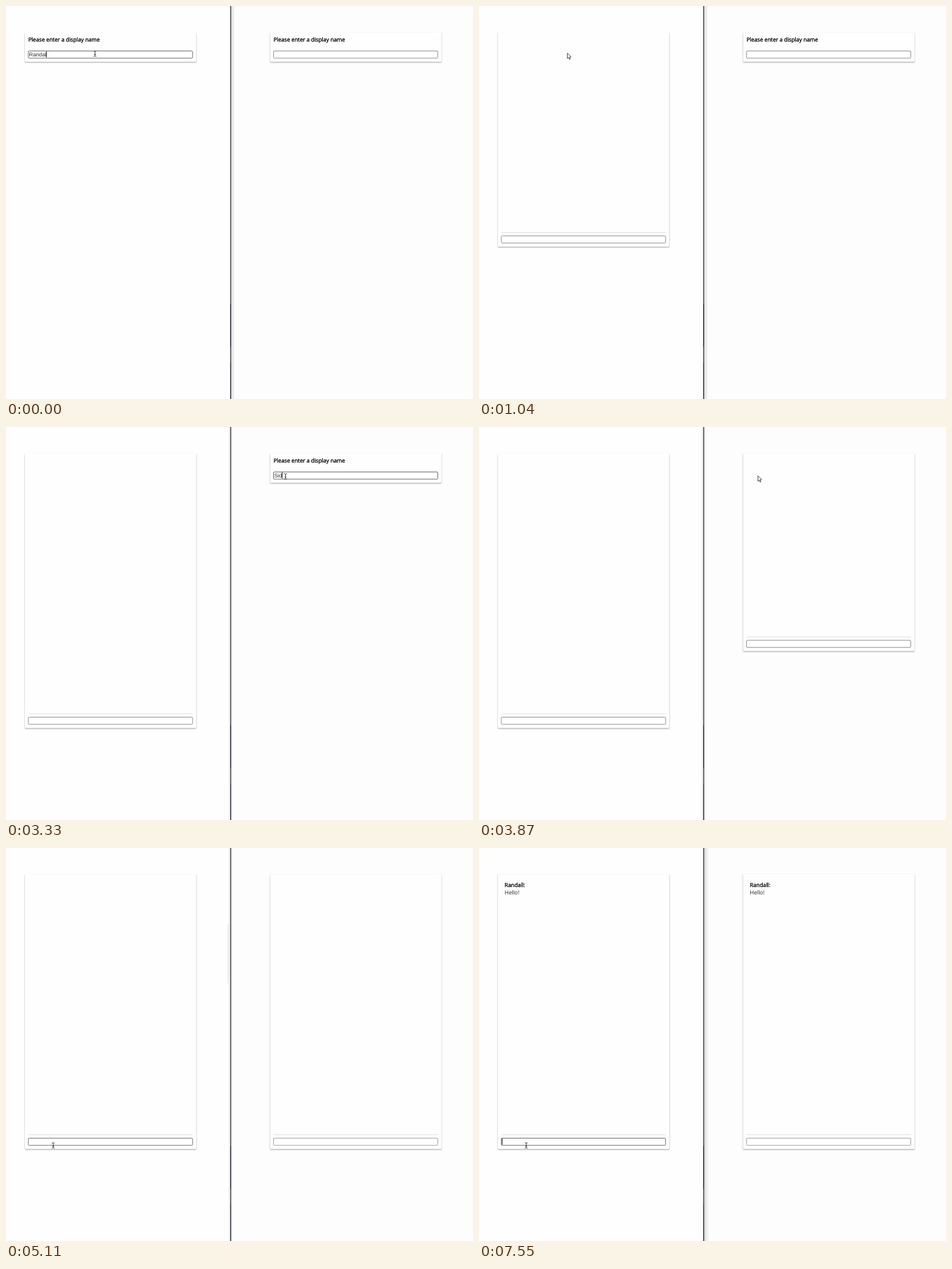
Recreate the animation shown at these times as an HTML page with a canvas. Size 816 by 686 pixels, loop 8000 ms.

```html
<!DOCTYPE html>
<html lang="en">
<head>
<meta charset="utf-8">
<title>Chat demo</title>
<style>
html, body { margin: 0; width: 100%; height: 100%; overflow: hidden; background: #fefefe; }
canvas { display: block; }
</style>
</head>
<body>
<canvas id="stage" width="816" height="686"></canvas>
<script>
const ctx = document.getElementById('stage').getContext('2d');
const LOOP = 8000;
const TOP = 46, SHORT = 97.5, TALL = 525.5;
const LEFT_X = 33, RIGHT_X = 461.5;
const PAGE_FONT = '9.6px "Open Sans", "Noto Sans", sans-serif';
const FIELD_FONT = '9.6px "Liberation Sans", Arial, sans-serif';
const FIRST_USER = 'Randall', SECOND_USER = 'Sid', GREETING = 'Hello!';
const OPEN_LEFT = 640, OPEN_RIGHT = 3510, SENT = 7550;
const GROW_DELAY = 55, GROW_TIME = 760;
const RIGHT_ACTIVE = 2290, LEFT_ACTIVE = 5240;

const clamp = v => Math.max(0, Math.min(1, v));
const mix = (a, b, p) => a + (b - a) * p;
const smooth = p => p * p * (3 - 2 * p);
const between = (t, a, b) => t >= a && t < b;
const typed = (t, text, times) => text.slice(0, times.filter(at => t >= at).length);

// cubic-bezier(.25, .1, .25, 1)
function ease(x) {
  const bezier = (s, a, b) => 3 * (1 - s) ** 2 * s * a + 3 * (1 - s) * s * s * b + s ** 3;
  let lo = 0, hi = 1;
  for (let i = 0; i < 24; i++) {
    const mid = (lo + hi) / 2;
    if (bezier(mid, 0.25, 0.25) < x) lo = mid; else hi = mid;
  }
  return bezier(lo, 0.1, 1);
}

function rect(x, y, w, h, color) {
  ctx.fillStyle = color;
  ctx.fillRect(x, y, w, h);
}

function roundRect(x, y, w, h, r) {
  ctx.beginPath();
  ctx.roundRect(x, y, w, h, r);
}

function text(str, x, y, font, color, bold) {
  ctx.font = font;
  ctx.textRendering = 'geometricPrecision';
  ctx.fillStyle = ctx.strokeStyle = color;
  ctx.fillText(str, x, y);
  if (bold) {
    ctx.lineWidth = 0.35;
    ctx.strokeText(str, x, y);
  }
}

function card(x, bottom) {
  for (const [blur, alpha] of [[2.4, 0.16], [1.8, 0.3]]) {
    ctx.save();
    ctx.shadowColor = `rgba(0,0,0,${alpha})`;
    ctx.shadowBlur = blur;
    ctx.shadowOffsetY = 0.9;
    ctx.fillStyle = '#fefefe';
    roundRect(x, TOP, 299.5, bottom - TOP, 1.5);
    ctx.fill();
    ctx.restore();
  }
}

function field(x, bottom, { value = '', caret = false, border = '#858585' }) {
  roundRect(x + 6, bottom - 19, 287, 12.5, 1.5);
  ctx.fillStyle = '#fff';
  ctx.fill();
  ctx.strokeStyle = border;
  ctx.lineWidth = 1;
  ctx.stroke();
  const start = x + 7.2;
  text(value, start, bottom - 9.5, FIELD_FONT, '#333');
  if (caret) {
    const end = Math.floor(start + ctx.measureText(value).width);
    rect(end, Math.round(bottom - 18.5), 1, 11, '#222');
  }
}

function panel(t, x, opened, input) {
  const grow = ease(clamp((t - opened - GROW_DELAY) / GROW_TIME));
  const bottom = mix(SHORT, TALL, grow);
  card(x, bottom);
  if (t < opened) {
    text('Please enter a display name', x + 5.9, 62, PAGE_FONT, '#000', true);
  } else {
    rect(x + 6, Math.round(bottom - 25.5), 287.5, 1, '#dedede');
  }
  if (t >= SENT) {
    text(FIRST_USER + ':', x + 11.8, 68, PAGE_FONT, '#000', true);
    text(GREETING, x + 11.8, 81, PAGE_FONT, '#222');
  }
  field(x, bottom, input);
}

function leftInput(t) {
  if (t < OPEN_LEFT) {
    return {
      value: typed(t, FIRST_USER, [0, 0, 0, 0, 0, 0, 450]),
      caret: !between(t, 110, 450),
      border: '#5a5a5a'
    };
  }
  return {
    value: t < SENT ? typed(t, GREETING, [6070, 6430, 6680, 6810, 6990, 7360]) : '',
    caret: t >= 5360 && !between(t, 5750, 6070),
    border: t >= 5360 ? '#5a5a5a' : t >= 5080 ? '#666' : '#858585'
  };
}

function rightInput(t) {
  const focused = between(t, 2420, OPEN_RIGHT);
  return {
    value: focused ? typed(t, SECOND_USER, [3090, 3210, 3330]) : '',
    caret: focused && !between(t, 2850, 3090),
    border: focused ? '#5a5a5a' : t > 4280 ? '#999' : '#858585'
  };
}

function windowEdge(t) {
  if (t < RIGHT_ACTIVE) {
    rect(394, 0, 4.5, 686, '#e9e9e9');
  } else if (t >= LEFT_ACTIVE) {
    const shade = ctx.createLinearGradient(393, 0, 402, 0);
    shade.addColorStop(0, '#d4d4d4');
    shade.addColorStop(0.5, '#ececec');
    shade.addColorStop(1, '#fdfdfd');
    ctx.fillStyle = shade;
    ctx.fillRect(393, 0, 9, 686);
  } else {
    rect(389, 0, 2, 686, '#f2f2f2');
  }
  if (between(t, 4700, LEFT_ACTIVE)) rect(387, 132, 4, 104, '#efefef');
  rect(391, 0, 1, 686, '#c4c4c4');
  rect(392, 0, 1, 686, '#444');
  rect(393, 0, 1, 686, '#a0a0a0');
  rect(392, 503, 1, 17, '#51454a');
  rect(392, 520, 1, 75, '#0b0c24');
  rect(392, 622, 1, 64, '#1b2130');
}

function iBeam(x, y) {
  ctx.strokeStyle = '#333';
  ctx.lineWidth = 1;
  ctx.beginPath();
  ctx.moveTo(x - 2, y - 4.5);
  ctx.quadraticCurveTo(x + 0.5, y - 4.5, x + 0.5, y - 3);
  ctx.quadraticCurveTo(x + 0.5, y - 4.5, x + 3, y - 4.5);
  ctx.moveTo(x + 0.5, y - 3.5);
  ctx.lineTo(x + 0.5, y + 4);
  ctx.moveTo(x - 2, y + 5);
  ctx.quadraticCurveTo(x + 0.5, y + 5, x + 0.5, y + 3.5);
  ctx.quadraticCurveTo(x + 0.5, y + 5, x + 3, y + 5);
  ctx.moveTo(x - 1, y + 1.5);
  ctx.lineTo(x + 2, y + 1.5);
  ctx.stroke();
}

function arrow(x, y) {
  ctx.save();
  ctx.translate(x - 0.6, y - 0.8);
  ctx.beginPath();
  ctx.moveTo(0, 0);
  for (const [px, py] of [[0, 9.4], [2.2, 7.5], [3.7, 11], [5.2, 10.3], [3.8, 7], [6.6, 6.8]]) {
    ctx.lineTo(px, py);
  }
  ctx.closePath();
  ctx.fillStyle = '#fff';
  ctx.fill();
  ctx.strokeStyle = '#222';
  ctx.lineWidth = 0.9;
  ctx.stroke();
  ctx.restore();
}

function pointer(t) {
  let x = 155, y = 83;
  if (t >= 1870) {
    const p = smooth(clamp((t - 1870) / 420));
    x = mix(477, 488, p);
    y = mix(81, 86, p);
  } else if (t >= 1590) {
    const p = smooth(clamp((t - 1560) / 310));
    x = mix(155, 477, p);
    y = mix(83, 81, p) - 34 * Math.sin(Math.PI * p);
  }
  if (t >= 4460) {
    const p = smooth(clamp((t - 4430) / 670));
    x = mix(488, 82, p);
    y = mix(86, 519, p);
  }
  const isArrow = between(t, OPEN_LEFT, 1850) || between(t, OPEN_RIGHT, 5060);
  (isArrow ? arrow : iBeam)(x, y);
}

function draw(now) {
  const t = now % LOOP;
  rect(0, 0, 392, 686, '#fefefe');
  rect(392, 0, 424, 686, '#fdfdfd');
  windowEdge(t);
  panel(t, LEFT_X, OPEN_LEFT, leftInput(t));
  panel(t, RIGHT_X, OPEN_RIGHT, rightInput(t));
  pointer(t);
}

const begin = performance.now();
function tick() {
  draw(performance.now() - begin);
  requestAnimationFrame(tick);
}
tick();
</script>
</body>
</html>
```
